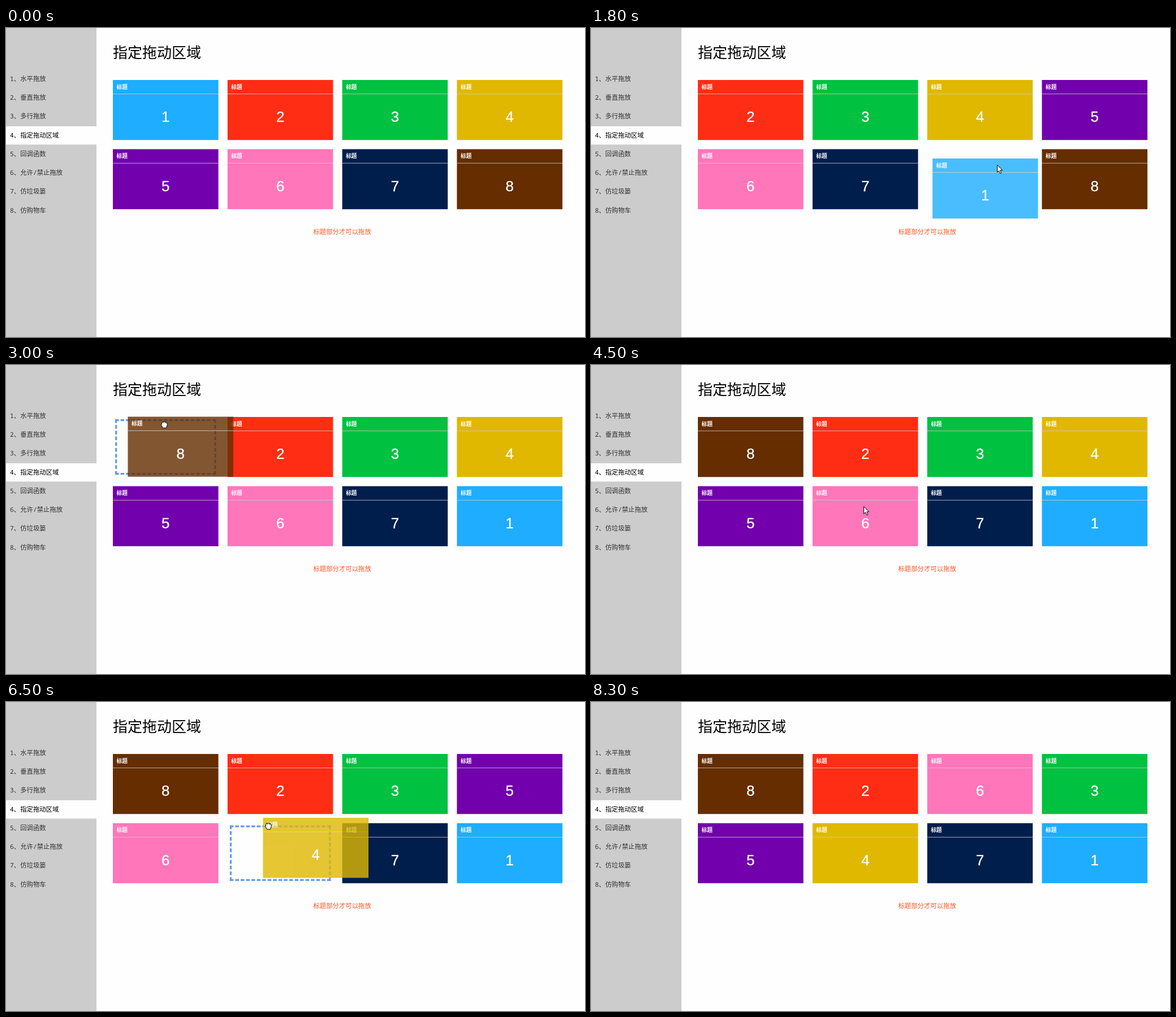
An HTML page for the animation above (8700 ms loop, 1024x547 px).

```html
<!DOCTYPE html>
<html lang="zh-CN">
<head>
<meta charset="utf-8">
<title>指定拖动区域</title>
<style>
html, body { margin: 0; width: 100%; height: 100%; overflow: hidden; background: #fefefe; }
svg { position: absolute; left: 0; top: 0; }
text { font-family: "Noto Sans CJK SC", "Noto Sans CJK", sans-serif; }
.menu { font: 11.36px "Noto Sans Mono", "Noto Sans CJK SC", "Noto Sans CJK", monospace; fill: #333; }
.menu.on { fill: #000; }
.title { font-size: 12px; font-weight: bold; fill: #fff; }
.num { font: 32px "Liberation Sans", Arial, sans-serif; fill: #fff; stroke: #fff; stroke-width: .4; text-anchor: middle; }
#slot {
  position: absolute; left: 0; top: 0; box-sizing: border-box; width: 220px; height: 121px;
  border: 4px dashed #6299f2; transform-origin: 0 0;
}
</style>
</head>
<body>
<div id="slot"></div>
<svg width="1024" height="547" viewBox="0 0 1024 547">
  <rect width="160" height="547" fill="#ccc"/>
  <rect y="174" width="160" height="32.3" fill="#fefefe"/>
  <g id="menu"></g>
  <text x="189" y="53" font-size="26">指定拖动区域</text>
  <text x="543.5" y="365.3" font-size="11.36" fill="#ff5722">标题部分才可以拖放</text>
  <g id="cards"></g>
  <g id="cursor" fill="#fff" stroke="#000" stroke-linejoin="round">
    <path id="arrow" d="M.5.5V13.5L3.5 10.7L5.6 15.6L7.8 14.6L5.7 9.8H9.7Z"/>
    <path id="hand" d="M-4.5-3.5Q-4-6-2-5.2Q0-6.5 1.5-5.2Q4-5.8 4.3-3.5Q5.8-3 5.3 0L3.5 5.3H-2.5L-5.3 1Q-6-1-4.5-1ZM-2-5V-3M1.3-5V-3M4-3.5V-2"/>
  </g>
</svg>
<script>
const LOOP = 8700, STEP = 100;
const SCALE = 0.8113;                      // the page is shown reduced
const LEFT = 189, TOP = 92;
const CARD_W = 230, CARD_H = 131, GAP = 20;
const COL = (CARD_W + GAP) * SCALE, ROW = (CARD_H + GAP) * SCALE;
const $ = id => document.getElementById(id);
const menu = ['水平拖放', '垂直拖放', '多行拖放', '指定拖动区域', '回调函数', '允许/禁止拖放', '仿垃圾篓', '仿购物车'];
const colors = ['#1eadff', '#ff2d14', '#00c140', '#e0b800', '#7200ac', '#ff76ba', '#001e4c', '#652d00'];

// Pointer moves: start and end time, where to, and how far the way bows out
const entry = [1007, 68];
const moves = [
  { from: 100, to: 600, end: [303, 103], bow: [0, 60] },
  { from: 1000, to: 1600, end: [718, 242] },
  { from: 1800, to: 2600, end: [862, 229], bow: [-240, -56] },
  { from: 2600, to: 3000, end: [280, 106] },
  { from: 3200, to: 3600, end: [292, 154] },
  { from: 3600, to: 4400, end: [482, 250], bow: [180, 60] },
  { from: 4500, to: 5300, end: [717, 153], bow: [-300, -40] },
  { from: 5400, to: 5800, end: [807, 107] },
  { from: 6100, to: 6500, end: [464, 220] },
  { from: 6500, to: 6700, end: [422, 233] },
  { from: 6800, to: 7100, end: [333, 215] },
  { from: 7200, to: 7500, end: [685, 121] },
  { from: 7500, to: 7700, end: [746, 77] },
  { from: 7900, to: 8300, end: [1080, 104] }
];
// Mouse button down and up
const presses = [[1000, 1800], [2600, 3200], [6100, 6700], [7200, 7800]];

$('menu').innerHTML = menu.map((label, i) =>
  `<text class="menu${i === 3 ? ' on' : ''}" x="7" y="${93.8 + i * 41 * SCALE}">${i + 1}、${label}</text>`).join('');
$('cards').innerHTML = colors.map((color, i) => `<g>
  <rect width="${CARD_W}" height="${CARD_H}" fill="${color}"/>
  <rect y="30" width="${CARD_W}" height="1" fill="#ccc"/>
  <text class="title" x="8" y="19.5">标题</text>
  <text class="num" x="115" y="91.5">${i + 1}</text></g>`).join('');
const cards = [...$('cards').children];

const placeCard = (el, x, y, opacity) => {
  el.setAttribute('transform', `translate(${x} ${y}) scale(${SCALE})`);
  el.setAttribute('opacity', opacity);
};
const show = (el, on) => { el.style.display = on ? '' : 'none'; };
const clamp = (v, max) => Math.max(0, Math.min(max, v));
const slotPos = i => [LEFT + i % 4 * COL, TOP + Math.floor(i / 4) * ROW];
const slotAt = (x, y) =>
  clamp(Math.floor((x - LEFT) / COL), 3) + 4 * clamp(Math.floor((y - TOP) / ROW), 1);

function pointer(t) {
  let pos = entry;
  for (const { from, to, end, bow = [0, 0] } of moves) {
    if (t < from) break;
    const k = clamp((t - from) / (to - from), 1);
    const eased = k * k * (3 - 2 * k);
    pos = pos.map((p, n) => p + (end[n] - p) * eased + bow[n] * 4 * eased * (1 - eased));
  }
  return pos;
}

function draw(t) {
  const order = [...cards.keys()];
  let active = null;
  for (const [down, up] of presses) {
    if (t < down) break;
    const start = pointer(down), now = pointer(Math.min(t, up));
    const source = slotAt(...start);
    const [x, y] = slotPos(source).map((p, n) => p + now[n] - start[n]);
    const target = slotAt(x + CARD_W * SCALE / 2, y + CARD_H * SCALE / 2);
    const [card] = order.splice(source, 1);
    order.splice(target, 0, card);
    // A released card stays in the air for one step before it snaps
    if (t < up + STEP) active = { el: cards[card], x, y, target, held: t < up };
  }

  order.forEach((card, i) => placeCard(cards[card], ...slotPos(i), 1));
  if (active) {
    placeCard(active.el, active.x, active.y, 0.8);
    if (active.el !== $('cards').lastChild) $('cards').append(active.el);
    const [x, y] = slotPos(active.target).map(p => p + 5 * SCALE);
    $('slot').style.transform = `translate(${x}px, ${y}px) scale(${SCALE})`;
  }

  const held = !!active && active.held;
  show($('slot'), held);
  show($('hand'), held);
  show($('arrow'), !held);
  show($('cursor'), t >= moves[0].from && t < moves[moves.length - 1].to);
  $('cursor').setAttribute('transform', `translate(${pointer(t).map(Math.round)})`);
}

function tick() {
  draw(Math.floor(performance.now() % LOOP / STEP) * STEP);
  requestAnimationFrame(tick);
}
tick();
</script>
</body>
</html>
```
